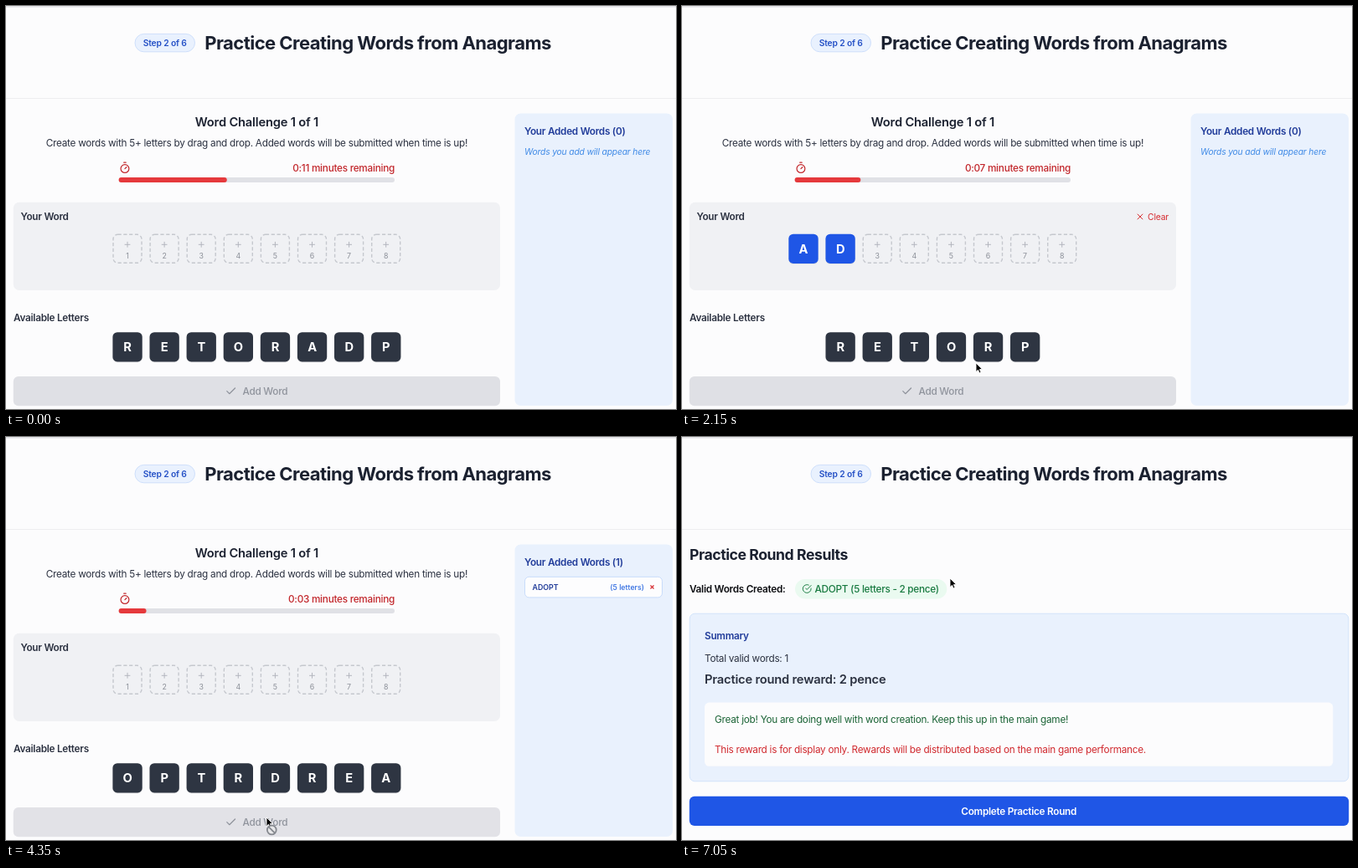
Write an HTML page that moves like this. It is 800 px wide and 482 px high and loops after 7.1 s.

```html
<!DOCTYPE html>
<html lang="en">
<head>
<meta charset="utf-8">
<title>Anagram practice</title>
<style>
  html, body { margin: 0; width: 100%; height: 100%; overflow: hidden; background: #fcfcfd; }
  svg { display: block; width: 800px; height: 482px; }
  text { font-family: Inter, "Open Sans", sans-serif; font-optical-sizing: none; white-space: pre; }
</style>
</head>
<body>
<svg id="stage" viewBox="0 0 800 482"></svg>
<script>
const LOOP = 7100, STEP = 50;
const ADDED = 4200, ALERT = 5400, RESULTS = 6400;
const PITCH = 44.1, TILE = 35.3, MID = 299.4;
const BLUE = '#1f56e6', INK = '#2b3140', RED = '#c2262b';

// letter, time picked up, time dropped
const drags = [['A', 650, 1050], ['D', 1650, 1900], ['O', 2300, 2600], ['P', 2950, 3300], ['T', 3650, 3900]];

// pointer path: time, x, y
const path = [
  [100, 430, 446], [500, 370, 409], [650, 370, 409], [1050, 148, 293], [1500, 394, 411],
  [1650, 394, 411], [1900, 190, 293], [2150, 351, 427], [2300, 324, 411], [2600, 235, 293],
  [2900, 388, 410], [2950, 388, 410], [3300, 279, 293], [3500, 295, 352], [3650, 321, 409],
  [3900, 322, 293], [4150, 311, 455], [4400, 311, 455], [4600, 330, 400], [5300, 440, 190],
  [5950, 528, 91], [6400, 528, 91], [7000, 320, 169], [7100, 320, 169]
];

const spacing = size => size > 15 ? -.025 : size > 12 ? -.013 : size > 11 ? -.022 : size > 10 ? -.015 : 0;

function text(x, y, str, size, weight, fill, anchor = 'start', extra = '') {
  return `<text x="${x}" y="${y}" font-size="${size}" font-weight="${weight}" fill="${fill}" ` +
    `text-anchor="${anchor}" letter-spacing="${spacing(size) * size}" ${extra}>${str}</text>`;
}
function rect(x, y, w, h, r, fill, extra = '') {
  return `<rect x="${x}" y="${y}" width="${w}" height="${h}" rx="${r}" fill="${fill}" ${extra}/>`;
}
function icon(x, y, scale, color, d) {
  return `<path transform="translate(${x} ${y}) scale(${scale})" d="${d}" fill="none" stroke="${color}" ` +
    `stroke-width="2" stroke-linecap="round" stroke-linejoin="round"/>`;
}
function tile(cx, cy, letter, fill, extra = '') {
  return `<g ${extra}>` + rect(cx - TILE / 2, cy - TILE / 2 + .8, TILE, TILE, 5.5, '#00000018') +
    rect(cx - TILE / 2, cy - TILE / 2, TILE, TILE, 5.5, fill) +
    text(cx, cy + 5.3, letter, 14.7, 700, '#fff', 'middle') + '</g>';
}

// cubic-bezier(.4, 0, .2, 1)
function ease(x) {
  let lo = 0, hi = 1, s = .5;
  for (let i = 0; i < 20; i++) {
    s = (lo + hi) / 2;
    const bx = 1.2 * (1 - s) ** 2 * s + .6 * (1 - s) * s * s + s ** 3;
    if (bx < x) lo = s; else hi = s;
  }
  return 3 * s * s - 2 * s ** 3;
}

function pointerAt(t) {
  if (t < path[0][0]) return null;
  const i = path.findIndex(k => k[0] > t);
  const [t0, x0, y0] = path[i - 1], [t1, x1, y1] = path[i];
  const p = (t - t0) / (t1 - t0), e = p * p * (3 - 2 * p);
  return { x: x0 + (x1 - x0) * e, y: y0 + (y1 - y0) * e };
}
const inside = (p, x, y, w, h) => p && p.x >= x && p.x <= x + w && p.y >= y && p.y <= y + h;

function arrow(p) {
  return `<path transform="translate(${p.x} ${p.y})" d="M0 0V10.6L2.5 8.3L4.1 12L6 11.2L4.4 7.6H7.7Z" ` +
    `fill="#000" stroke="#fff" stroke-width=".9" stroke-linejoin="round"/>`;
}
function moveCursor(p) {
  const d = 'M0-5.5L2-3H.7V-.7H3V-2L5.5 0L3 2V.7H.7V3H2L0 5.5L-2 3H-.7V.7H-3V2L-5.5 0L-3-2V-.7H-.7V-3H-2Z';
  return `<path transform="translate(${p.x} ${p.y})" d="${d}" fill="#000" stroke="#fff" ` +
    `stroke-width="1.6" paint-order="stroke"/>`;
}
function blockedCursor(p) {
  return arrow(p) + `<g transform="translate(${p.x + 6.3} ${p.y + 15})" fill="#e8e8ea" stroke="#85888e">` +
    '<circle r="5.4" stroke-width="1.8"/><path d="M-3.6-3.6L3.6 3.6" stroke-width="1.8"/></g>';
}

function header() {
  return rect(0, 0, 800, 482, 0, '#fcfcfd') + rect(0, 0, 800, 1.6, 0, '#e3e3e7') +
    rect(0, 110, 800, 1, 0, '#ededf0') +
    rect(154, 33.4, 71.5, 21.4, 10.7, '#e9f1fe', 'stroke="#c6dafa" stroke-width=".8"') +
    text(189.7, 47.8, 'Step 2 of 6', 10.29, 600, '#2450c6', 'middle') +
    text(237.2, 52.2, 'Practice Creating Words from Anagrams', 22.05, 700, '#1b2130');
}

function timer(t) {
  const u = t / 500 + .25, n = Math.min(Math.floor(u), 10);
  const left = 12 - n - ease(Math.min(u - n, 1));
  return icon(134.6, 186, .6125, RED, 'M10 2h4M12 14l3-3M4 14a8 8 0 1 0 16 0a8 8 0 1 0-16 0') +
    text(464, 197.7, `0:${String(11 - n).padStart(2, '0')} minutes remaining`, 11.76, 500, RED, 'end') +
    rect(134.6, 205, 329.4, 6, 3, '#e0e1e6') + rect(134.6, 205, 329.4 * left / 30, 6, 3, '#e5393c');
}

function sidebar(added) {
  let out = rect(607.5, 128.5, 188.5, 349.5, 7, '#e9f1fd') +
    text(619, 153.8, `Your Added Words (${+added})`, 11.76, 600, '#213c9a');
  if (!added) return out + text(619, 177.8, 'Words you add will appear here', 10.29, 400, '#3f8ae6', 'start', 'font-style="italic"');
  return out + rect(619.5, 167.3, 164, 24.6, 5, '#fdfdfe', 'stroke="#c3d9fa" stroke-width=".9"') +
    text(628.5, 182.5, 'ADOPT', 8.82, 600, '#213c9a') +
    text(762, 182.5, '(5 letters)', 8.82, 500, '#2f6be0', 'end') +
    text(771.5, 182.6, '×', 9.6, 700, '#d62c30', 'middle');
}

function game(t, pointer) {
  const added = t >= ADDED;
  const word = added ? [] : drags.filter(d => t >= d[2]).map(d => d[0]);
  const pool = added ? [...'OPTRDREA'] : [...'RETORADP'].filter(l => !word.includes(l));
  const held = drags.find(d => t >= d[1] && t < d[2]);
  const ready = word.length >= 5;
  const onButton = inside(pointer, 9, 443, 581, 35);
  let onTile = false;

  let out = header() + text(MID, 144.2, 'Word Challenge 1 of 1', 14.7, 600, '#1b2130', 'middle') +
    text(MID, 168.2, 'Create words with 5+ letters by drag and drop. Added words will be submitted when time is up!',
      11.76, 400, INK, 'middle') +
    timer(t) + sidebar(added) +
    rect(8.8, 234.8, 581.2, 105.2, 7, '#f0f1f4') + text(17.5, 256.3, 'Your Word', 11.76, 600, INK);

  if (word.length) {
    out += icon(541.1, 246.1, .49, '#d62c30', 'M18 6L6 18M6 6l12 12') +
      text(581, 255.9, 'Clear', 10.29, 400, '#d62c30', 'end');
  }
  for (let i = 0; i < 8; i++) {
    const cx = 145 + PITCH * i;
    out += word[i] ? tile(cx, 290.3, word[i], BLUE) :
      rect(cx - 17, 273.3, 34, 34, 5.5, 'none', 'stroke="#c5c8ce" stroke-width="1.4" stroke-dasharray="4.2 2.6"') +
      `<path d="M${cx - 3.4} 285.3h6.8m-3.4-3.4v6.8" stroke="#b3b6be" stroke-width="1"/>` +
      text(cx, 301.6, i + 1, 8.82, 400, '#8b8f98', 'middle');
  }

  out += text(9, 376.8, 'Available Letters', 11.76, 600, INK);
  pool.forEach((letter, i) => {
    const cx = MID + (i - (pool.length - 1) / 2) * PITCH;
    const hover = inside(pointer, cx - TILE / 2, 390.2, TILE, TILE);
    onTile ||= hover;
    out += tile(cx, 407.8, letter, hover ? '#434956' : '#2e3542');
  });

  const label = ready ? '#fff' : '#8f939c';
  out += rect(8.8, 443, 581.2, 35.2, 6, ready ? BLUE : onButton ? '#e2e2e7' : '#dfe0e5') +
    icon(261.3, 453.3, .6125, label, 'M20 6L9 17l-5-5') +
    text(282.5, 465.2, 'Add Word', 11.76, 500, label);

  if (t >= ALERT) out += alertBox();
  if (held) out += tile(pointer.x, pointer.y, held[0], '#2e3542', 'opacity=".6"');
  if (!pointer) return out;
  if (onButton && !ready) return out + blockedCursor(pointer);
  return out + (onTile && !held ? moveCursor(pointer) : arrow(pointer));
}

function alertBox() {
  const shadow = 'style="filter:drop-shadow(0 3px 6px #0005)" stroke="#c9c9cd" stroke-width=".7"';
  const line = (y, str) => text(252, y, str, 9.55, 400, '#222327');
  return rect(237.3, -12, 329.6, 128, 8, '#fefefe', shadow) +
    text(252, 26, 'localhost:5173 says', 11.9, 500, '#222327', 'start', 'style="letter-spacing:0"') +
    line(47.8, "Time's up! All of your added words have been submitted. Let's") +
    line(62.4, 'review your practice round results') +
    rect(505, 78, 47.3, 23.4, 8.5, '#2a2bb0') + text(528.6, 93.3, 'OK', 9.55, 500, '#fff', 'middle');
}

function results(pointer) {
  return header() + text(9, 147.2, 'Practice Round Results', 17.64, 700, '#1b2130') +
    text(9, 185.8, 'Valid Words Created:', 11.76, 600, '#0b0c10') +
    rect(135, 170, 181.3, 23.4, 11.7, '#eafaf0') +
    icon(143.3, 175.6, .49, '#17793f', 'M22 11.08V12a10 10 0 1 1-5.93-9.14M22 4L12 14.01l-3-3') +
    text(158.5, 185.8, 'ADOPT (5 letters - 2 pence)', 11.76, 500, '#17793f') +
    rect(9.2, 211.2, 786.6, 200.6, 6, '#e9f1fd', 'stroke="#cbdffa" stroke-width=".8"') +
    text(27, 242.3, 'Summary', 11.76, 600, '#213c9a') +
    text(27, 268.9, 'Total valid words: 1', 11.76, 400, INK) +
    text(27, 294.6, 'Practice round reward: 2 pence', 14.7, 600, INK) +
    rect(27, 317.6, 750.3, 76.2, 5.5, '#fcfcfd') +
    text(39, 342.3, 'Great job! You are doing well with word creation. Keep this up in the main game!', 11.76, 400, '#1a6335') +
    text(39, 377.6, 'This reward is for display only. Rewards will be distributed based on the main game performance.',
      11.76, 400, '#d0292e') +
    rect(8.8, 429.8, 787.4, 35.3, 6, BLUE) +
    text(402.2, 451.8, 'Complete Practice Round', 11.76, 600, '#fff', 'middle') + arrow(pointer);
}

const stage = document.getElementById('stage');
const start = performance.now();
let last = -1;
function frame() {
  const t = Math.floor((performance.now() - start) % LOOP / STEP) * STEP;
  if (t !== last) {
    const pointer = pointerAt(t);
    stage.innerHTML = t >= RESULTS ? results(pointer) : game(t, pointer);
    last = t;
  }
  requestAnimationFrame(frame);
}
frame();
</script>
</body>
</html>
```
